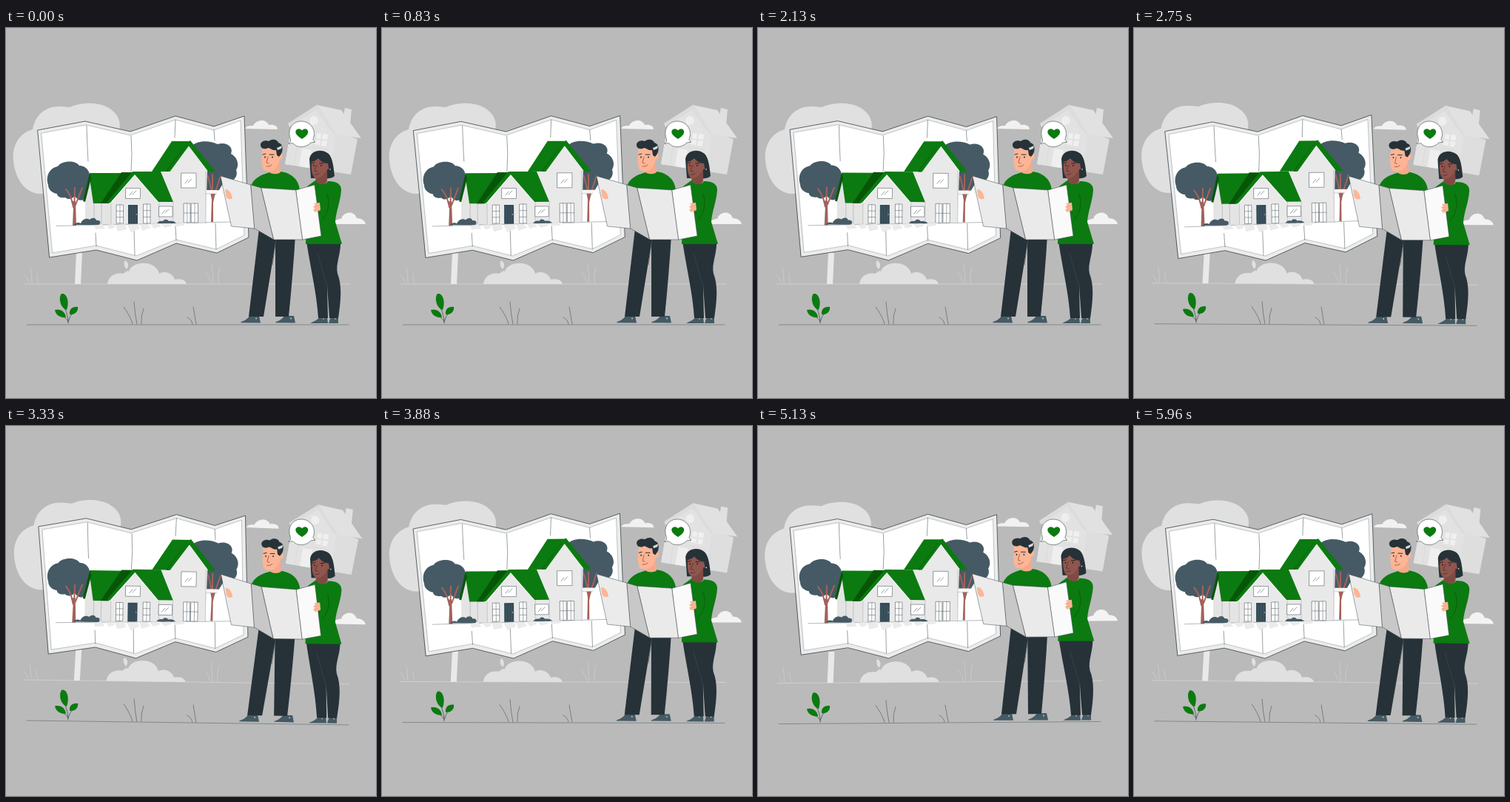
Animation of 500x500 px, one loop 6000 ms. Source, as an HTML page with a canvas:

```html
<!DOCTYPE html>
<html lang="en">
<head>
<meta charset="utf-8">
<title>House plan</title>
<style>
html, body { margin: 0; width: 100%; height: 100%; overflow: hidden; background: #bababa; }
canvas { display: block; width: 100vw; height: 100vh; }
</style>
</head>
<body>
<canvas id="stage" width="500" height="500"></canvas>
<script>
const ctx = document.getElementById('stage').getContext('2d');
const LOOP = 6000;
const C = {
  bg: '#bababa', pale: '#e0e0e0', green: '#0b7a10', deep: '#075608',
  navy: '#263238', slate: '#455a64', bark: '#a3625a', skin: '#fdb595',
  brown: '#8f564e', ink: '#37434a', wall: '#e9e9e9', white: '#fff'
};

function fill(d, color) {
  ctx.fillStyle = color;
  ctx.fill(new Path2D(d));
}
function line(d, color = C.ink, width = 0.6) {
  ctx.strokeStyle = color;
  ctx.lineWidth = width;
  ctx.stroke(new Path2D(d));
}
function shape(d, color, edge, width) {
  fill(d, color);
  line(d, edge, width);
}
function oval(x, y, rx, ry, color, turn = 0) {
  ctx.fillStyle = color;
  ctx.beginPath();
  ctx.ellipse(x, y, rx, ry, turn, 0, Math.PI * 2);
  ctx.fill();
}
function pane(x, y, w, h, cols, rows) {
  ctx.fillStyle = C.white;
  ctx.fillRect(x, y, w, h);
  ctx.strokeStyle = C.ink;
  ctx.lineWidth = 0.5;
  ctx.strokeRect(x, y, w, h);
  let d = '';
  for (let i = 1; i < cols; i++) d += `M${x + w * i / cols} ${y}v${h}`;
  for (let i = 1; i < rows; i++) d += `M${x} ${y + h * i / rows}h${w}`;
  if (d) line(d, C.ink, 0.45);
}
function glint(x, y) {
  line(`M${x} ${y}l4 -5M${x + 4} ${y - 1}l5 -5`, C.ink, 0.5);
}

// Swing: 0 -> 1 -> -1 -> 0, straight between the turning points
function swing(p) {
  p -= Math.floor(p);
  if (p < 0.25) return p * 4;
  if (p < 0.75) return 2 - p * 4;
  return p * 4 - 4;
}
function turned(x, y, deg, draw) {
  ctx.save();
  ctx.translate(x, y);
  ctx.rotate(deg * Math.PI / 180);
  ctx.translate(-x, -y);
  draw();
  ctx.restore();
}

function farHouse() {
  fill('M386 131L377 184L466 198L475 150L446 140L420 107Z', '#dedede');
  fill('M455 124L458 108L467 110L465 132Z', '#e0e0e0');
  fill('M420 107L386 132L377 184L438 193L446 141Z', '#e2e2e2');
  fill('M420 104L453 111L480 149L446 144Z', '#e1e1e1');
  fill('M420 104L381 129L383 134L419 111L442 143L447 144Z', '#dcdcdc');
  fill('M400 163L413 165L409 189L396 187Z', '#efefef');
  oval(416, 125, 5.7, 6, '#efefef');
  fill('M420 142L426 143L425 150L419 149ZM428 143L435 144L434 151L427 150ZM418 151L425 152L424 158L417 157ZM427 152L434 153L432 160L426 159Z', '#f0f0f0');
  line('M396 137L390 184M414 161L436 165', '#d6d6d6', 0.6);
}

function backdrop() {
  fill('M60 224H44C25 222 12 203 10 179C8 157 19 142 36 137C39 119 52 106 72 106C79 106 83 107 87 107C99 101 127 98 143 111C155 120 157 135 149 147L60 170Z', C.pale);
  line('M25 346H465', '#d8d8d8', 0.7);
  fill('M95 304H103L101 346H93Z', '#e9e9e9');
  fill('M137 346C138 336 147 330 158 332C163 329 164 327 166 329C170 314 203 313 207 332C215 327 226 332 228 340C236 338 243 341 244 346Z', C.pale);
  fill('M161 314C166 317 166 323 163 326C159 322 159 317 161 314Z', C.pale);
  line('M25 334Q30 339 31 344M33 324Q35 333 35 344M42 332Q42 339 44 345M270 330Q276 337 277 345M278 318Q280 332 280 345M289 323Q286 334 287 345', '#d3d3d3', 0.6);
  fill('M323 136C325 132 330 132 334 132C338 124 351 122 355 131C362 130 367 132 367 137Z', '#f1f1f1');
  fill('M440 265C444 260 448 258 453 258C456 248 470 246 474 257C480 257 485 260 486 265Z', '#f3f3f3');
  farHouse();
}

function leftTree() {
  fill('M57 212C53 200 59 189 70 187C75 179 94 178 99 186C109 186 115 195 113 206L106 231C101 235 96 232 93 227C89 232 83 232 80 229C74 230 69 228 69 224C62 223 57 218 57 212Z', C.slate);
  fill('M90 267L91 243L88 234L94 234L95 267Z', C.bark);
  line('M91 242Q89 228 81 218M92.5 237L93 216M94 239L103 216', C.bark, 2);
}
function rightTree() {
  fill('M251 160C256 152 275 151 286 157C298 153 308 161 304 170C312 174 316 184 311 192C315 202 304 211 295 207L288 219L270 221L264 198L249 181Z', C.slate);
  fill('M277 262L278 232L276 222H283L280 236V262Z', C.bark);
  line('M273 200L279 225M279 198V224M290 200L281 227', C.bark, 2);
}

function villa() {
  // tall wing
  fill('M247 158L272 192L270 263L206 265V194L222 192Z', C.wall);
  fill('M270 219H285V224H270Z', '#f6f6f6');
  line('M270 224H285M270 193V263M226 235V264', '#a6a6a6', 0.5);
  fill('M224 153H250L220 194H197Z', C.green);
  fill('M247 157L222 194H216L243 158Z', C.deep);
  fill('M249 152L283 194H273L247 160L222 194H217L246 154Z', C.green);
  line('M222 194L247 160L272 193', '#f8f8f8', 0.8);

  // low wing
  fill('M114 199L107 235V265H143V235L130 235Z', '#e4e4e4');
  line('M119 237V265M129 237V265', '#9a9a9a', 0.5);
  fill('M174 198L207 236V265H142V237Z', C.wall);
  line('M142 237V265M207 235V264', '#a6a6a6', 0.5);
  fill('M113 196H163L137 237H118L113 203Z', C.green);
  fill('M113 196L104 234L107 235L115 203Z', C.deep);
  fill('M156 195H174L139 237H128Z', C.deep);
  fill('M174 194H209L226 235H206L174 198L141 236H136L171 194Z', C.green);
  line('M142 237L174 199L206 236', '#fafafa', 0.8);

  pane(162, 216.5, 19.5, 14, 1, 1); glint(167, 226);
  pane(207, 241, 18, 14, 1, 1); glint(211, 251);
  pane(237, 196, 20, 20, 1, 1); glint(242, 210);
  pane(149.5, 239, 9, 25, 2, 3);
  pane(186, 238, 9, 26, 2, 3);
  pane(240.5, 237, 8.5, 26, 2, 2);
  pane(250.5, 237, 9, 26, 2, 2);
  fill('M165 239H178V265H165Z', '#344b57');
  line('M168 242V262M175 242V262M171.5 242V262', '#536873', 0.5);
  oval(176.3, 252, 0.7, 0.7, '#cfd8dc');
  line('M106 266L271 263', '#aaa', 0.5);

  fill('M92 266C94 263 98 262 101 264C104 257 110 257 113 259C117 255 122 257 122 260C127 259 129 263 126 266Z', C.slate);
  fill('M204 264C206 261 209 260 212 261C215 257 219 259 220 261C225 260 229 262 230 264Z', C.slate);

  fill('M119 267L130 265L134 271L121 272ZM135 266L146 265L147 270L140 272ZM148 266L161 265L163 272L151 275ZM164 266L178 265L181 271L169 276ZM181 266L191 265L196 270L184 274ZM195 265L207 264L209 268L200 271ZM210 265L222 264L225 267L215 270ZM226 264L244 263L240 267L229 268Z', '#ebebeb');
}

function poster() {
  shape('M43 138L107 126L168 140L229 119L281 133L322 119L328 283L285 304L230 291L177 314L122 300L59 310Z', '#ececec', C.ink, 0.8);
  shape('M48 142L108 131L168 145L229 124L281 138L317 125L322 280L284 299L230 286L176 308L122 294L63 304Z', C.white, '#7d868b', 0.45);
  line('M109 132Q110 165 111 180M169 146Q171 170 169 194M229 124L228 148M281 138L282 152M121 277L122 295M173 273L174 307M229 268L230 287M283 264L284 299', C.ink, 0.5);
  leftTree();
  rightTree();
  line('M68 267.5L305 262', '#68737a', 0.5);
  villa();
}

function ground() {
  line('M28 401H463', '#4d565b', 0.5);
  line('M84 399Q84 387 79 378M84 397Q86 389 91 384M84 396Q80 391 74 387', C.ink, 0.7);
  fill('M75 359C82 358 86 369 82 381C74 379 70 365 75 359Z', C.green);
  fill('M86 387C85 380 90 376 97 377C98 383 93 388 86 387Z', C.green);
  fill('M66 381C73 379 80 383 81 391C74 392 67 388 66 381Z', C.green);
  line('M159 377Q168 389 171 400M173 370Q174 386 177 400M186 379Q182 389 183 400M245 391Q251 394 252 400M253 377Q255 389 257 400', '#4d565b', 0.6);
}

function shoe(x, w) {
  fill(`M${x} 398.3Q${x} 397 ${x + 3} 396.3Q${x + 9} 394 ${x + w * 0.45} 389H${x + w - 2}L${x + w} 398.5Z`, C.slate);
  oval(x + w * 0.78, 392.5, 0.9, 0.9, '#cfd8dc');
}

function man() {
  shoe(317, 27);
  shoe(364, 27);
  fill('M342 271L366 279L348 390H328Z', C.navy);
  fill('M364 280H391Q388 330 382 390H364Z', C.navy);
  line('M365 285L360 320', '#47545b', 0.6);
  fill('M330 217C333 203 345 198 357 195L371 194C386 196 396 205 397 220L391 245H338Z', C.green);
  fill('M356 183L370 178L371 195C367 198 360 198 356 195Z', '#f6a88b');
  fill('M347 162C345 174 345 189 349 192C356 196 366 191 369 182L371 164L359 157Z', C.skin);
  oval(370.5, 173, 3.3, 4.8, C.skin);
  fill('M344 159C343 154 350 151 355 153C360 149 367 151 368 155C374 156 375 164 372 170L369 174L366 172L365 165C360 166 357 162 354 162C351 164 345 164 344 159Z', C.navy);
  fill('M366 162L373 159L372 163L367 165Z', '#d8dadb');
  line('M347 171L351 170M356 171L362 171', C.navy, 1);
  oval(350, 174.5, 0.8, 1.2, C.navy);
  oval(360, 174.5, 0.8, 1.2, C.navy);
  line('M354 174L352 182L355 183M352 187Q356 188 359 185', '#80453b', 0.7);
}

function woman() {
  fill('M412 398.5Q419 396 424 391H434L435 399H411ZM436 399L439 390H449V399Z', C.slate);
  oval(429, 393, 0.8, 0.8, '#cfd8dc');
  oval(445, 393, 0.8, 0.8, '#cfd8dc');
  fill('M406 288H452C453 305 445 318 448 332C454 347 453 366 449 392H437L434 348L435 392H422C420 359 411 322 406 288Z', C.navy);
  line('M421 305L435 353', '#3f4c53', 0.6);
  fill('M410 177C412 164 428 163 436 170C442 176 443 192 444 200C440 204 432 204 426 203H412Z', C.navy);
  fill('M420 194L434 187V207C430 214 422 214 418 206Z', '#7f4a43');
  fill('M413 178C412 190 413 200 418 203C425 204 434 197 435 184L431 174L421 172Z', C.brown);
  oval(435, 187, 3, 4, C.brown);
  fill('M411 181C410 168 427 165 435 172C441 178 441 192 443 200L438 200L435 183C429 183 425 180 422 176C419 179 415 181 411 181Z', C.navy);
  line('M413 183L417 182M424 183L429 183', '#2c1a18', 0.9);
  oval(416, 186, 0.8, 1.1, '#211817');
  oval(426, 186, 0.8, 1.1, '#211817');
  line('M420 185L417 193L421 194M417 198Q420 199 423 197', '#4f2824', 0.7);
  oval(438, 191, 0.8, 0.8, '#e7e7e7');
  fill('M407 214L418 206C422 213 431 213 435 207C447 207 453 211 453 219C452 235 446 247 445 262L454 292H405Z', C.green);
  line('M434 224C439 240 434 252 427 259', C.deep, 0.7);
}

function heldMap() {
  shape('M290 200L331 212L336 271L305 268Z', '#ebebeb', C.ink, 0.5);
  shape('M331 212L345 216L362 286L336 271Z', '#c8c8c8', C.ink, 0.5);
  shape('M345 216L392 219L401 286H362Z', '#eaeaea', C.ink, 0.5);
  shape('M392 219L417 212L426 281L401 286Z', '#fafafa', C.ink, 0.5);
  fill('M296 218C302 218 305 224 306 230C302 233 297 230 297 225Z', C.skin);
  fill('M416 237L424 236L425 246L418 249L415 246L418 244L415 242L418 240Z', C.skin);
  line('M416 241H421M416 245H421', '#d88c76', 0.5);
}

function bubble() {
  shape('M382 156C385 154 385 152 384 149C380 137 387 126 399 126C412 126 420 139 415 150C415 152 416 153 418 154L412 155C404 163 393 162 388 156Z', C.white, C.ink, 0.6);
  fill('M400 150C394 146 390.5 143 391.5 139C393.5 135 398 135.5 400 138.5C402 135.5 406.5 135 408 139C409 143 406 146 400 150Z', C.green);
}

function render(t) {
  const tilt = t < 2480 ? 0 : 0.9 * swing((t - 2480) / 3000);
  const sway = swing(t / 1500);
  ctx.fillStyle = C.bg;
  ctx.fillRect(0, 0, 500, 500);
  ctx.lineCap = ctx.lineJoin = 'round';
  turned(248, 253, tilt, backdrop);
  turned(186, 217, sway, poster);
  bubble();
  turned(248, 385, tilt, ground);
  turned(248, 253, tilt, () => {
    man();
    woman();
    heldMap();
  });
}

const start = performance.now();
function tick() {
  render((performance.now() - start) % LOOP);
  requestAnimationFrame(tick);
}
tick();
</script>
</body>
</html>
```
